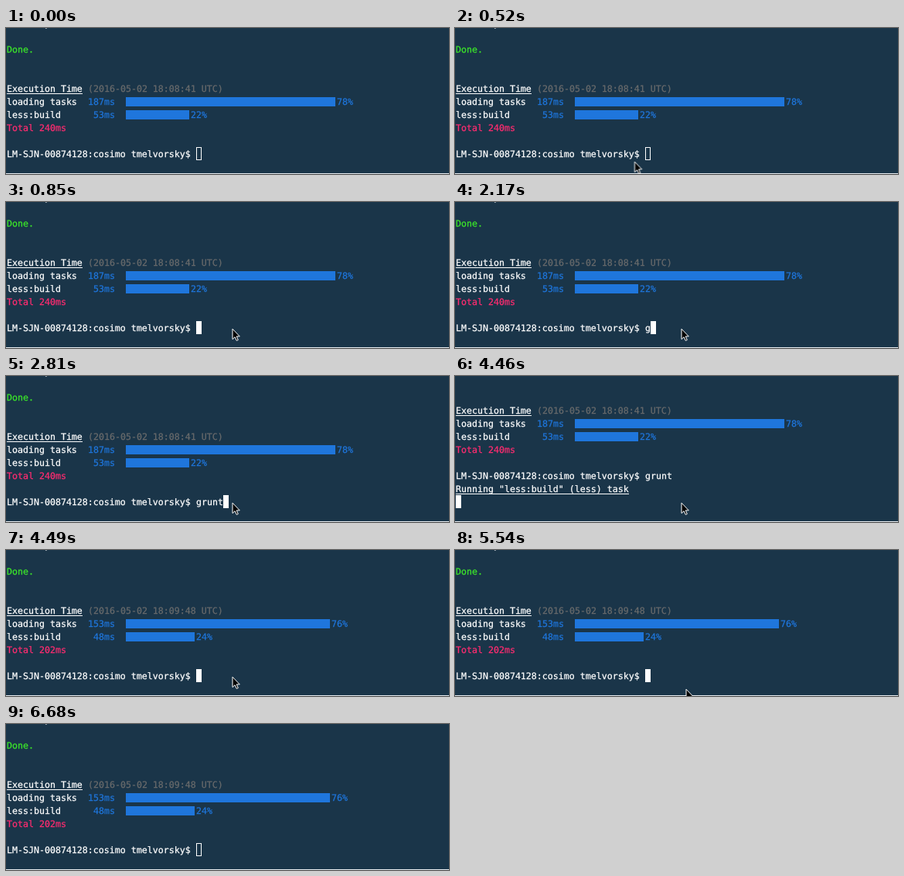
An HTML page that plays this animation: 573x190 px, repeating every 6.78 s.

```html
<!DOCTYPE html>
<html lang="en">
<head>
<meta charset="utf-8">
<title>Terminal</title>
<style>
  html, body { margin: 0; width: 100%; height: 100%; overflow: hidden; background: #1a3549; }
  svg { display: block; width: 573px; height: 190px; }
  text {
    font: 11.627px "DejaVu Sans Mono", monospace;
    white-space: pre;
    text-rendering: geometricPrecision;
    fill: currentColor;
    stroke: currentColor;
    stroke-width: .25px;
  }
  svg { color: #fff; }
  .green { color: #3ce62a; }
  .grey { color: #686a6b; }
  .blue { color: #1f76dc; }
  .pink { color: #ff2c70; }
  .bar { fill: #1f76dc; }
  .line { fill: #fff; }

  .anim { animation: 6780ms step-end infinite; }
  #before { animation-name: before; }
  #running { animation-name: running; }
  #after { animation-name: after; }
  #caret { animation-name: caret; }
  #box { animation-name: focus; }
  #mouse { animation-name: mouse; }

  /* old report scrolls up line by line, then the new one replaces it */
  @keyframes before {
    0% { transform: none; opacity: 1; }
    56.932% { transform: translateY(-17px); opacity: 1; }
    65.781% { transform: translateY(-34px); opacity: 1; }
    66.224%, 100% { transform: translateY(-34px); opacity: 0; }
  }
  @keyframes running {
    0% { opacity: 0; }
    65.781%, 100% { opacity: 1; }
  }
  @keyframes after {
    0% { opacity: 0; }
    66.224%, 100% { opacity: 1; }
  }
  @keyframes caret {
    0% { transform: translateX(246px); }
    32.005% { transform: translateX(253px); }
    35.103% { transform: translateX(260px); }
    37.168% { transform: translateX(267px); }
    39.823% { transform: translateX(274px); }
    41.445% { transform: translateX(281px); }
    56.932% { transform: translateX(1px); }
    66.224%, 100% { transform: translateX(246px); }
  }
  @keyframes focus {
    0% { fill: #1a3549; }
    12.536% { fill: #fff; }
    98.525%, 100% { fill: #1a3549; }
  }
  @keyframes mouse {
    0% { transform: translate(142px, 200px); }
    5.752% {
      transform: translate(142px, 186px);
      animation-timing-function: cubic-bezier(.25, .5, .4, 1);
    }
    12.09% { transform: translate(292px, 164px); }
    81.268% { transform: translate(294px, 169px); }
    81.71% { transform: translate(298px, 180px); }
    82.153%, 100% { transform: translate(298px, 200px); }
  }
</style>
</head>
<body>
<svg viewBox="0 0 573 190">
  <defs>
    <!-- parts common to both reports -->
    <g id="common">
      <text x="1" y="-2"><tspan class="green" fill="#3ce62a">&gt;&gt;</tspan> 1 stylesheet created.</text>
      <text class="green" x="1" y="32">Done.</text>
      <text x="1" y="83">Execution Time</text>
      <rect class="line" x="1" y="85" width="98" height="1"/>
      <text x="1" y="100">loading tasks</text>
      <text x="1" y="117">less:build</text>
      <text x="1" y="168">LM-SJN-00874128:cosimo tmelvorsky$</text>
    </g>
  </defs>

  <g id="before" class="anim">
    <use href="#common"/>
    <text class="grey" x="106" y="83">(2016-05-02 18:08:41 UTC)</text>
    <text class="blue" x="106" y="100">187ms</text>
    <rect class="bar" x="155" y="90" width="271" height="12"/>
    <text class="blue" x="428" y="100">78%</text>
    <text class="blue" x="113" y="117">53ms</text>
    <rect class="bar" x="155" y="107" width="82" height="12"/>
    <text class="blue" x="239" y="117">22%</text>
    <text class="pink" x="1" y="134">Total 240ms</text>
    <text x="246" y="168">grunt</text>
    <g id="running" class="anim">
      <text x="1" y="185">Running "less:build" (less) task</text>
      <rect class="line" x="1" y="187" width="224" height="1"/>
    </g>
  </g>

  <g id="after" class="anim">
    <use href="#common"/>
    <text class="grey" x="106" y="83">(2016-05-02 18:09:48 UTC)</text>
    <text class="blue" x="106" y="100">153ms</text>
    <rect class="bar" x="155" y="90" width="264" height="12"/>
    <text class="blue" x="421" y="100">76%</text>
    <text class="blue" x="113" y="117">48ms</text>
    <rect class="bar" x="155" y="107" width="89" height="12"/>
    <text class="blue" x="246" y="117">24%</text>
    <text class="pink" x="1" y="134">Total 202ms</text>
  </g>

  <!-- the caret carries a cover that hides letters not typed yet -->
  <g id="caret" class="anim">
    <rect y="155" width="37" height="17" fill="#1a3549"/>
    <rect id="box" class="anim" x=".5" y="155.5" width="6" height="16" stroke="#fff"/>
  </g>

  <rect y="189" width="573" height="1" fill="#e9edf0"/>

  <g id="mouse" class="anim">
    <path d="M1 1.2V14.6L4.1 11.7 6.2 16.4 8.3 15.5 6.2 10.9H10.3Z" fill="#000" stroke="#fff"/>
  </g>
</svg>
</body>
</html>
```
